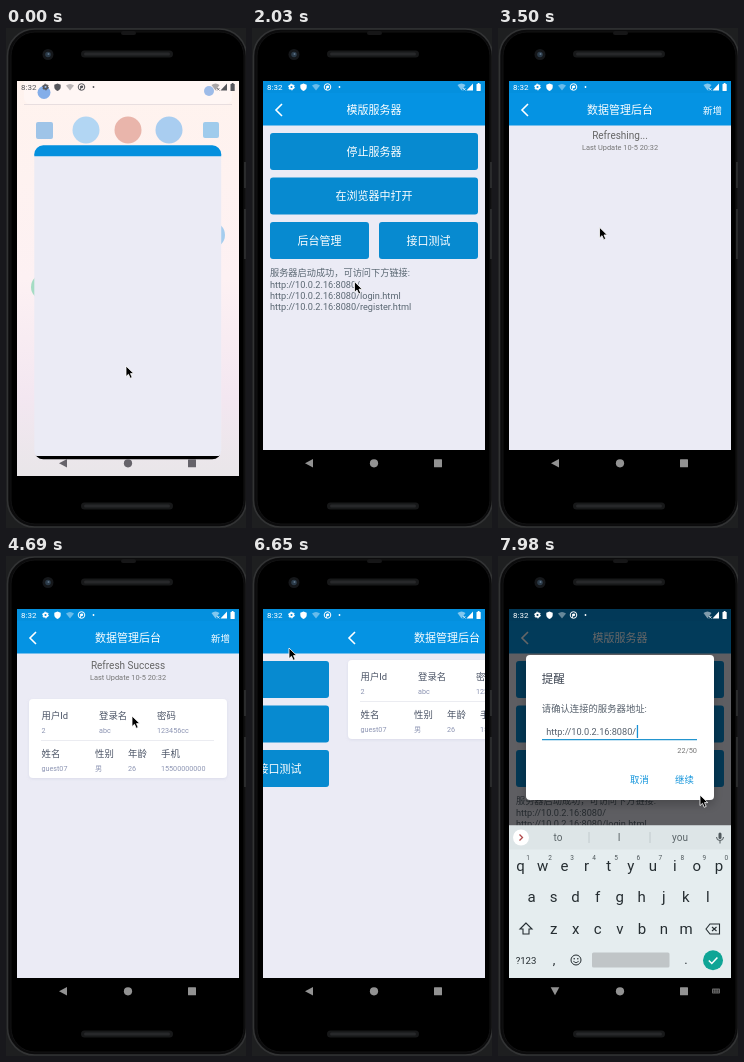
An HTML page for the animation above (8000 ms loop, 240x500 px).

```html
<!DOCTYPE html>
<html lang="zh-CN">
<head>
<meta charset="utf-8">
<title>Phone demo</title>
<style>
html, body { margin: 0; width: 100%; height: 100%; overflow: hidden; background: #1d1e20; }
svg { display: block; width: 100%; height: 100%; }
text { font-family: Roboto, "Noto Sans CJK SC", "Noto Sans CJK", sans-serif; }
</style>
</head>
<body>
<svg id="stage" viewBox="0 0 240 500"></svg>
<script>
const LOOP = 8000, STEP = 70, WIDTH = 222;
const BLUE = '#0593e3', BUTTON = '#078ad0', PAPER = '#ebebf5';

const rect = (x, y, w, h, fill, rx = 0, more = '') =>
  `<rect x="${x}" y="${y}" width="${w}" height="${h}" rx="${rx}" fill="${fill}" ${more}/>`;
const dot = (x, y, r, fill, more = '') => `<circle cx="${x}" cy="${y}" r="${r}" fill="${fill}" ${more}/>`;
const line = (d, color, w = 1, more = '') =>
  `<path d="${d}" fill="none" stroke="${color}" stroke-width="${w}" ${more}/>`;
const shape = (d, fill, more = '') => `<path d="${d}" fill="${fill}" ${more}/>`;
const label = (x, y, s, size, fill, anchor = 'start', more = '') =>
  `<text x="${x}" y="${y}" font-size="${size}" fill="${fill}" text-anchor="${anchor}" ${more}>${s}</text>`;
const mid = (x, y, s, size, fill) => label(x, y, s, size, fill, 'middle');
const group = (id, body, more = '') => `<g id="${id}" ${more}>${body}</g>`;

function phone() {
  return rect(0, 0, 240, 500, '#1e1f20') +
    rect(1.5, 1, 239, 498, '#0b0b0c', 27, 'stroke="#323334" stroke-width="1.6"') +
    rect(5, 4, 233, 492, '#000', 24, 'stroke="#121213"') +
    rect(115, 3, 15, 4, '#161617', 2) +
    rect(238, 134, 2, 26, '#2a2b2c') + rect(238, 181, 2, 50, '#2a2b2c') +
    [22.5, 474.5].map(y => rect(75, y, 92, 7, '#171819', 3.5) + rect(78, y + 2, 86, 3, '#27282a', 1.5)).join('') +
    dot(42, 26.5, 5.5, '#15171a') + dot(42, 26.5, 2.8, '#2b3a48') + dot(42.5, 26, 1, '#5f7488');
}

function launcher() {
  return rect(11, 53, WIDTH, 395, 'url(#wall)') +
    rect(18, 46, 208, 30, '#fff6f4', 6) + line('M18 76.5H226', '#e2dadc', 0.8) +
    dot(38, 64.5, 6.5, '#84aee9') + dot(203, 63, 5, '#9dbbe8') +
    rect(30, 94, 17, 17, '#9fc4e8', 2) + dot(80, 102, 13.5, '#b2d6f3') +
    dot(122, 102, 13.5, '#e9b5ab') + dot(163, 102, 13.5, '#a9cdf0') +
    rect(197, 94, 16, 16, '#9fcbec', 2) +
    dot(206, 207, 13, '#a5cdee') + dot(38, 259, 13, '#a5dcc4');
}

function titleBar(title) {
  return rect(11, 65, WIDTH, 32.5, BLUE) + mid(122, 86.2, title, 11, '#fff') +
    line('M30 76l-6 6 6 6', '#fff', 1.6);
}

function serverPage() {
  const button = (x, y, w, s) => rect(x, y, w, 37, BUTTON, 3) + mid(x + w / 2, y + 22.8, s, 11, '#fff');
  const url = 'http://10.0.2.16:8080/';
  return rect(11, 65, WIDTH, 357, PAPER) + titleBar('模版服务器') +
    button(18, 105, 208, '停止服务器') + button(18, 149.5, 208, '在浏览器中打开') +
    button(18, 194, 99, '后台管理') + button(127, 194, 99, '接口测试') +
    ['服务器启动成功，可访问下方链接:', url, url + 'login.html', url + 'register.html']
      .map((s, i) => label(18, 248.3 + i * 11.3, s, 9.2, '#5a6772')).join('');
}

function dataPage() {
  const cell = (x, y, name, value) =>
    label(x, y, name, 9.4, '#4b5466') + label(x, y + 14, value, 7.2, '#8d95b3');
  const card = rect(23, 104, 198, 79, '#fff', 4, 'filter="url(#soft)"') +
    line('M35 145.5H208', '#e6e7ee', 0.8) +
    cell(35.5, 123.5, '用户Id', '2') + cell(93, 123.5, '登录名', 'abc') + cell(151, 123.5, '密码', '123456cc') +
    cell(35.5, 161.8, '姓名', 'guest07') + cell(89, 161.8, '性别', '男') +
    cell(122, 161.8, '年龄', '26') + cell(155, 161.8, '手机', '15500000000');
  return rect(11, 65, WIDTH, 357, PAPER) +
    group('pull',
      label(122, 74.3, '', 10, '#666', 'middle', 'id="state"') +
      mid(122, 85, 'Last Update 10-5 20:32', 7.4, '#777') + group('card', card)) +
    titleBar('数据管理后台') + label(205, 85.5, '新增', 9.5, '#fff');
}

function dialog() {
  return rect(28, 99, 188, 145, '#fff', 4, 'filter="url(#shade)"') +
    label(43.8, 127.4, '提醒', 11.5, '#3b4350') +
    label(43.8, 156.3, '请确认连接的服务器地址:', 9.35, '#56606c') +
    label(48.2, 179.2, 'http://10.0.2.16:8080/', 9.2, '#56606c') +
    rect(138.8, 169, 1.3, 13, '#1590d5') + line('M44 183.6H199', '#2395cf', 1.2) +
    label(199, 197.2, '22/50', 7.4, '#777', 'end') +
    label(132, 227.3, '取消', 9.4, '#1696dc') + label(177, 227.3, '继续', 9.4, '#1696dc');
}

function keyboard() {
  const ink = '#252d31';
  const row = (keys, x, y) => [...keys].map((k, i) => mid(x + i * 22.05, y, k, 15, ink)).join('');
  const digits = [...'1234567890'].map((k, i) => mid(30 + i * 22.05, 303.7, k, 6.5, '#4f585c')).join('');
  return rect(11, 269.5, WIDTH, 153, '#e5edef') + rect(11, 269.5, WIDTH, 24, '#dde5e7') +
    dot(23, 281.5, 8, '#fff') + line('M21.5 278.5l3 3-3 3', '#b0484a', 1.3) +
    mid(60, 285, 'to', 10, '#5b6468') + mid(121, 285, 'I', 10, '#5b6468') + mid(182, 285, 'you', 10, '#5b6468') +
    line('M91 276v11M152 276v11', '#bcc5c8', 0.8) +
    rect(220.5, 276.5, 3, 6.5, '#4f585c', 1.5) + line('M218.5 281a3.5 3.5 0 0 0 7 0M222 285v2.5', '#4f585c', 1) +
    row('qwertyuiop', 22.5, 314.5) + digits + row('asdfghjkl', 33.5, 345.8) + row('zxcvbnm', 55.7, 377.8) +
    line('M28 367l-6 6h3v5h6v-5h3z', ink, 1.1) +
    line('M208 373l4-5h9.5v10h-9.5zM214 371l4.5 4M218.5 371l-4.5 4', ink, 1.1) +
    mid(28, 407.6, '?123', 9.6, ink) + mid(56, 407.6, ',', 13, ink) + mid(188, 407.6, '.', 13, ink) +
    dot(78, 404, 5, 'none', `stroke="${ink}"`) + dot(76.2, 402.7, 0.8, ink) + dot(79.8, 402.7, 0.8, ink) +
    line('M75.3 405.3q2.7 3 5.4 0', ink, 0.9) +
    rect(94, 396.5, 77.5, 15, '#c0c5c7', 1.5) +
    dot(215, 404.3, 10, '#0fa596') + line('M210.8 404.5l3 3 5.6-6', '#fff', 1.5);
}

function statusIcons() {
  const c = 'currentColor';
  return label(15, 62.2, '8:32', 8, c) +
    dot(39.5, 59, 1.9, 'none', `stroke="${c}" stroke-width="1.7"`) +
    dot(39.5, 59, 2.9, 'none', `stroke="${c}" stroke-width="1" stroke-dasharray="1.5 1.54"`) +
    shape('M51.5 55.5l3.2 1.2v2.3q0 2.6-3.2 4-3.2-1.4-3.2-4v-2.3z', c) +
    shape('M60 57.5q4-3 8 0l-4 5z', c, 'opacity=".4"') +
    dot(75.5, 59, 3.3, 'none', `stroke="${c}" stroke-width="1"`) + dot(75.8, 58.8, 1.4, c) +
    line('M74.6 58v4', c, 0.9) + dot(87.5, 59, 0.9, c) +
    shape('M205.5 57q4-3 8 0l-4 5.5z', c, 'opacity=".5"') + line('M211 60l2.5 2.5M213.5 60l-2.5 2.5', c, 0.7) +
    shape('M221 55.5v7h-6.5z', c) + rect(224.5, 56, 4.2, 7, c, 0.6) + rect(225.7, 55, 1.8, 1.5, c);
}

const stage = document.getElementById('stage');
stage.innerHTML = `<defs>
  <linearGradient id="wall" x2="0" y2="1">
    <stop stop-color="#fff3ee"/><stop offset=".5" stop-color="#fdf1f3"/>
    <stop offset=".8" stop-color="#f3e7f1"/><stop offset="1" stop-color="#e9e6e9"/>
  </linearGradient>
  <filter id="soft"><feDropShadow dx="0" dy="1" stdDeviation="1.5" flood-color="#9a9fc0" flood-opacity=".2"/></filter>
  <filter id="shade" x="-20%" y="-20%" width="140%" height="150%">
    <feDropShadow dx="0" dy="5" stdDeviation="5" flood-opacity=".22"/></filter>
  <clipPath id="screen">${rect(11, 53, WIDTH, 395, '#000')}</clipPath>
  <clipPath id="body">${rect(11, 53, WIDTH, 369, '#000')}</clipPath>
  <clipPath id="frame"><rect id="hole"/></clipPath>
</defs>` + phone() +
  `<g clip-path="url(#screen)">` + group('home', launcher()) +
  `<g clip-path="url(#frame)">` + group('app',
    rect(10, 421, WIDTH + 2, 28, '#000') + rect(10, 53, WIDTH + 2, 369, PAPER) +
    rect(10, 52, WIDTH + 2, 14, '#0490de') +
    `<g clip-path="url(#body)">` + group('server', serverPage()) + group('data', dataPage()) + '</g>') + '</g>' +
  group('scrim', rect(11, 53, WIDTH, 369, '#000')) + group('dialog', dialog()) +
  `<g clip-path="url(#body)">` + group('keys', keyboard()) + '</g>' +
  group('status', statusIcons()) +
  group('nav', group('back', shape('M53 435.3l8-4.3v8.6z', 'currentColor')) +
    group('hide', shape('M52.7 431.3h8.6l-4.3 8z', 'currentColor') +
      rect(214, 432.5, 8, 5, '#6a6a6a', 0.8) +
      line('M215 434.2h6M215 436h6', '#000', 0.8, 'stroke-dasharray="1 .7"')) +
    dot(122, 435.3, 4.1, 'currentColor') + rect(182, 431.3, 8, 8, 'currentColor', 0.5)) + '</g>' +
  group('mouse', shape('M0 0v10.6l2.5-2.3 1.7 4 2-.9-1.7-3.8h3.3z', '#000',
    'stroke="#fff" stroke-width=".8" stroke-linejoin="round"'));

const el = {};
stage.querySelectorAll('[id]').forEach(n => el[n.id] = n);

const mix = (a, b, p) => a + (b - a) * p;
const span = (t, from, to) => Math.min(1, Math.max(0, (t - from) / (to - from)));
const smooth = p => (1 - Math.cos(Math.PI * p)) / 2;
const easeOut = p => 1 - (1 - p) ** 2;
const move = (n, x, y) => n.setAttribute('transform', `translate(${x} ${y})`);
const fade = (n, a) => { n.setAttribute('opacity', a); n.style.display = a > 0 ? '' : 'none'; };

// time, x, y of the pointer tip
const PATH = [[0, 120, 338], [700, 122, 336], [1260, 130, 325], [1610, 130, 325], [2310, 88, 216],
  [2730, 91, 217], [3290, 98, 205], [4200, 126, 160], [5460, 126, 160], [6300, 28, 84],
  [6510, 28, 84], [6650, 37, 92], [7280, 174, 214], [7490, 176, 217], [7700, 179, 248], [7980, 202, 239]];

function pointer(t) {
  const i = Math.max(1, PATH.findIndex(k => k[0] >= t));
  const [a, b] = [PATH[i - 1], PATH[i]];
  const p = smooth(span(t, a[0], b[0]));
  move(el.mouse, mix(a[1], b[1], p), mix(a[2], b[2], p));
}

function draw(t) {
  // launch
  const open = easeOut(span(t, 0, 210));
  const x = mix(28.3, 11, open), y = mix(117.3, 53, open), s = mix(0.842, 1, open);
  const hole = { x, y, width: WIDTH * s, height: mix(431.3, 448, open) - y, rx: mix(9, 0, open) };
  for (const k in hole) el.hole.setAttribute(k, hole[k]);
  el.app.setAttribute('transform', `translate(${x} ${y}) scale(${s}) translate(-11 -53)`);
  fade(el.home, open < 1 ? 1 : 0);
  el.status.style.color = t < 140 ? '#55555a' : '#fff';
  el.nav.style.color = t < 140 ? '#66636a' : '#929292';

  // pages
  const slide = smooth(span(t, 2628, 2928)) - smooth(span(t, 6533, 6833));
  const shift = Math.round(WIDTH * slide);
  fade(el.server, span(t, 1086, 1386));
  move(el.server, -shift, 0);
  move(el.data, WIDTH - shift, 0);
  fade(el.data, slide > 0 ? 1 : 0);

  // refresh
  const pull = easeOut(span(t, 3290, 3570)) - easeOut(span(t, 4900, 5180));
  move(el.pull, 0, 39 * pull);
  el.state.textContent = t < 4270 ? 'Refreshing...' : 'Refresh Success';
  fade(el.card, t < 4270 ? 0 : 1);

  // dialog and keyboard
  const up = easeOut(span(t, 7770, 7960));
  fade(el.dialog, span(t, 7592, 7772));
  move(el.dialog, 0, 73 * (1 - up));
  fade(el.scrim, t < 7700 ? 0 : mix(0.08, 0.6, span(t, 7700, 7840)));
  move(el.keys, 0, 153 * (1 - up));
  fade(el.keys, up > 0 ? 1 : 0);
  fade(el.hide, up > 0 ? 1 : 0);
  fade(el.back, up > 0 ? 0 : 1);
  pointer(t);
}

const start = performance.now();
function tick() {
  const t = (performance.now() - start) % LOOP;
  draw(Math.floor(t / STEP) * STEP);
  requestAnimationFrame(tick);
}
tick();
</script>
</body>
</html>
```
